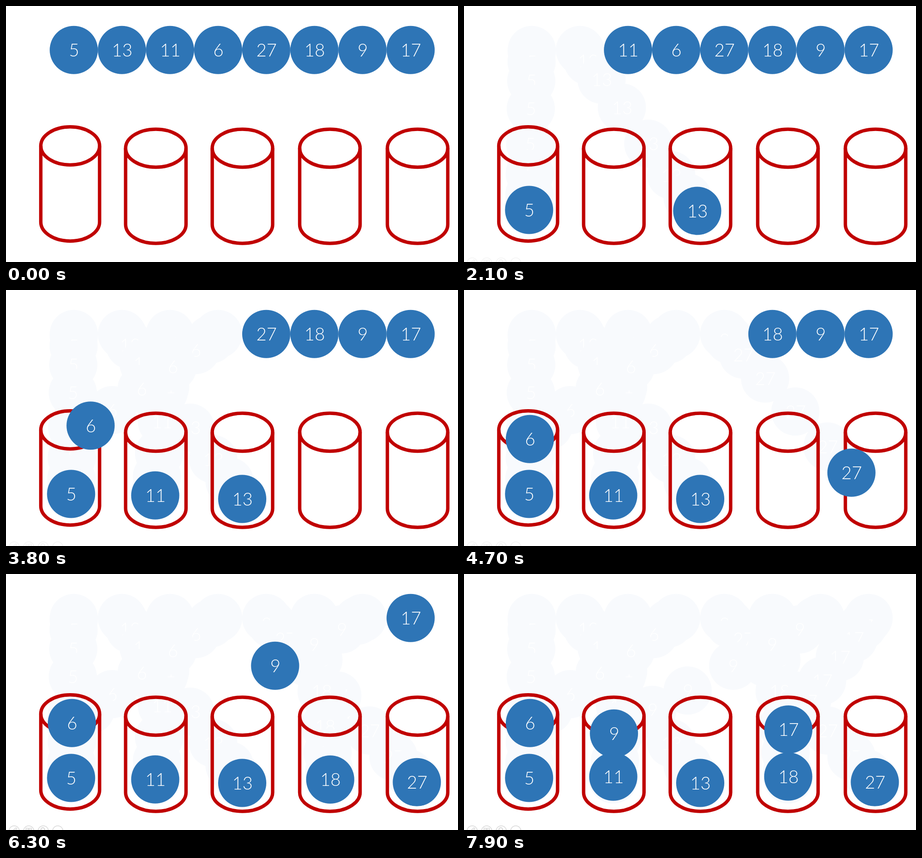
An HTML page for the animation above (8 s loop, 995 px wide and 563 px high).

```html
<!DOCTYPE html>
<html lang="en">
<head>
<meta charset="utf-8">
<title>Bucket sort</title>
<style>
  html, body { margin: 0; width: 100%; height: 100%; overflow: hidden; background: #fff; }
  svg { display: block; width: 995px; height: 563px; }
  text { font: 300 39px Lato, "Noto Sans CJK SC", sans-serif; text-anchor: middle; fill: #fff; }
  .ball circle { fill: #2e75b6; }
  .ghost circle { fill: #f8fafd; }
  #jars { fill: none; stroke: #c00000; stroke-width: 7.5; }
  #tools { fill: none; stroke: #d9d9d9; stroke-width: 1.5; }
</style>
</head>
<body>
<svg viewBox="0 0 995 563">
  <g id="ghosts"></g>
  <g id="jars"></g>
  <g id="tools">
    <circle cx="18" cy="565" r="11.3"/>
    <circle cx="50" cy="565" r="11.3"/>
    <circle cx="82" cy="565" r="11.3"/>
    <circle cx="114" cy="565" r="11.3"/>
    <path d="M14 565L22 558L24 560L17 567M44 559H49V563H44ZM51 559H56V563H51Z"/>
    <circle cx="81" cy="562" r="4" stroke-width="2"/>
  </g>
  <g id="balls"></g>
</svg>
<script>
  const LOOP = 8000, STEP = 100, MOVE = 850, SWAP = 7757;
  const RADIUS = 53, ROW_X = 149.2, ROW_Y = 96.8, GAP = 105.93;

  // label, departure time, resting place in its jar
  const balls = [
    [5, 436, 143.3, 448.5],
    [13, 1345, 520, 459.5],
    [11, 2256, 328.5, 451.8],
    [6, 3165, 145, 327.8],
    [27, 4087, 904.4, 457.8],
    [18, 4995, 713.7, 452],
    [9, 5909, 330.2, 344.8],
    [17, 6840, 714, 335.5]
  ].map(([label, start, x, y], i) => ({ label, start, x, y, x0: ROW_X + GAP * i, y0: ROW_Y }));

  const byLabel = n => balls.find(b => b.label === n);
  for (const [a, b] of [[9, 11], [17, 18]]) {
    byLabel(a).partner = byLabel(b);
    byLabel(b).partner = byLabel(a);
  }

  function ease(time, start) {
    const t = Math.min(1, Math.max(0, (time - start) / MOVE));
    return t < 0.5 ? 2 * t * t : 1 - 2 * (1 - t) ** 2;
  }

  function place(ball, time) {
    const p = ease(time, ball.start);
    let x = ball.x0 + (ball.x - ball.x0) * p;
    let y = ball.y0 + (ball.y - ball.y0) * p;
    if (ball.partner) {
      const q = ease(time, SWAP);
      x += (ball.partner.x - ball.x) * q;
      y += (ball.partner.y - ball.y) * q;
    }
    return `translate(${x.toFixed(2)} ${y.toFixed(2)})`;
  }

  function make(parent, name, attrs, content = "") {
    const el = document.createElementNS("http://www.w3.org/2000/svg", name);
    for (const key in attrs) el.setAttribute(key, attrs[key]);
    el.textContent = content;
    return parent.appendChild(el);
  }

  function disc(parent, kind, label) {
    const g = make(parent, "g", { class: kind });
    make(g, "circle", { r: RADIUS });
    make(g, "text", { x: 0.6, y: 14.4 }, label);
    return g;
  }

  const $ = id => document.getElementById(id);

  function jar(cx, cy, rx) {
    const ry = 41.8, height = 167.5;
    make($("jars"), "ellipse", { cx, cy, rx, ry });
    make($("jars"), "path", {
      d: `M${cx - rx} ${cy}v${height}a${rx} ${ry} 0 0 0 ${2 * rx} 0v${-height}`
    });
  }
  jar(141.3, 307.6, 64.7);
  [329.8, 520.5, 713, 906].forEach(x => jar(x, 312.7, 66.5));

  for (const ball of balls) ball.el = disc($("balls"), "ball", ball.label);

  // faint trail: one pale disc for every spot a ball has left
  const ghosts = [];
  for (let time = 0; time < LOOP - STEP; time += STEP) {
    for (const ball of balls) {
      const here = place(ball, time);
      if (here === place(ball, time + STEP)) continue;
      const el = disc($("ghosts"), "ghost", ball.label);
      el.setAttribute("transform", here);
      ghosts.push({ el, time });
    }
  }

  function toolOpacity(time) {
    if (time < 100) return 0;
    return time >= 1400 && time < 5000 ? 0.3 : 1;
  }

  function draw(time) {
    for (const ball of balls) ball.el.setAttribute("transform", place(ball, time));
    for (const g of ghosts) g.el.style.display = g.time < time ? "" : "none";
    $("tools").style.opacity = toolOpacity(time);
  }

  let shown = -1, origin;
  function tick(now) {
    origin ??= now;
    const time = Math.floor(((now - origin) % LOOP) / STEP) * STEP;
    if (time !== shown) draw(shown = time);
    requestAnimationFrame(tick);
  }
  draw(0);
  requestAnimationFrame(tick);
</script>
</body>
</html>
```
